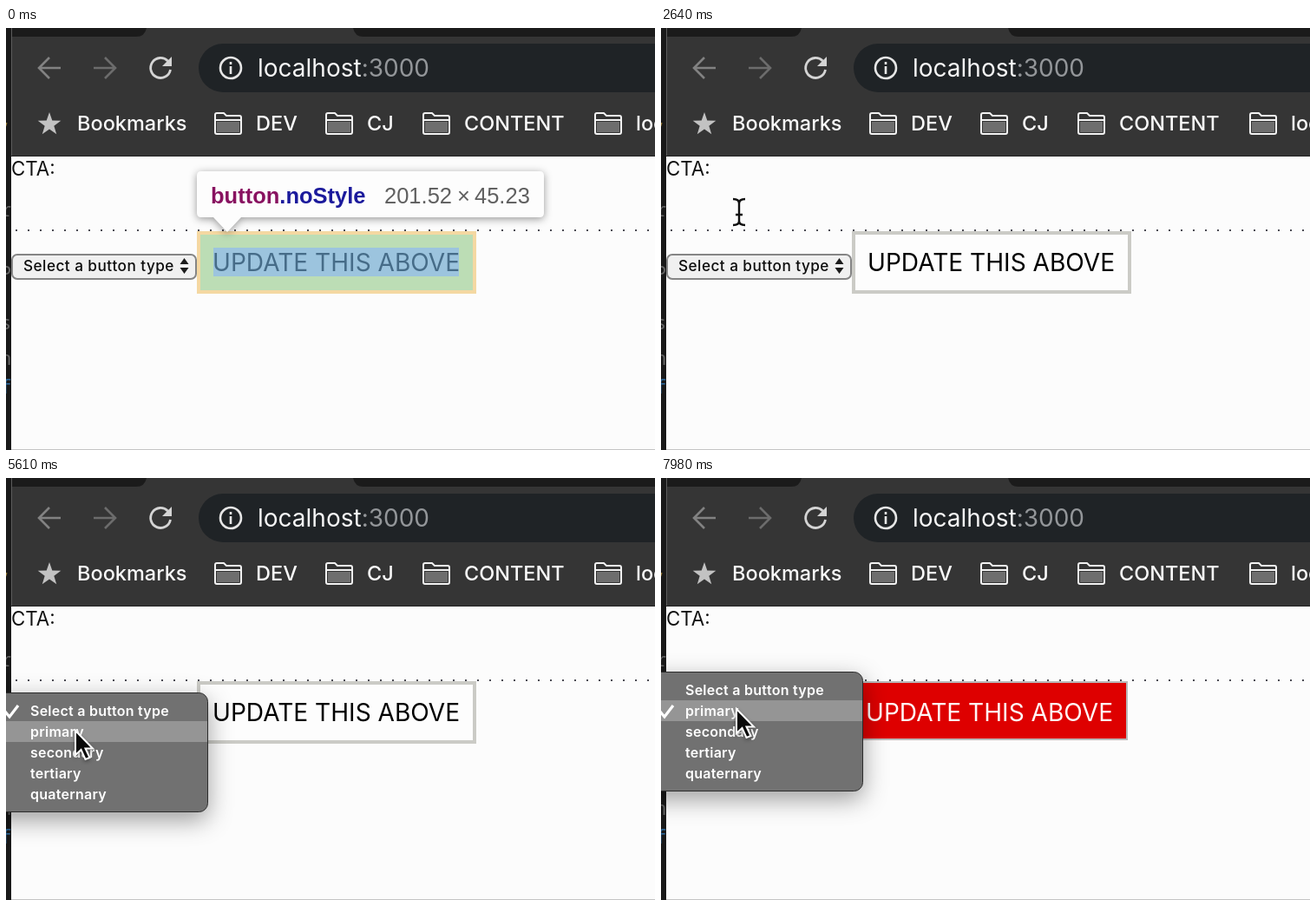
Animation, 748 px wide and 486 px high, one loop 8000 ms. Source, as an HTML page:

```html
<!DOCTYPE html>
<html lang="en">
<head>
<meta charset="utf-8">
<title>Button type picker</title>
<style>
  html, body { margin: 0; width: 100%; height: 100%; overflow: hidden; background: #fcfcfc; }
  svg { display: block; width: 748px; height: 486px; }
  text { font-family: Inter, sans-serif; white-space: pre; }
  .bookmarks text { font-size: 23.5px; font-weight: 500; fill: #fafafa; }
  .menu text { font-size: 16px; font-weight: 600; letter-spacing: .25px; fill: #fff; }
  .tip text { font-family: "Liberation Sans", Arial, sans-serif; font-size: 25.5px; }
  .code text { font: 21px "Noto Sans Mono", monospace; fill: #666; text-anchor: end; }
  .tip .label, .label { font: 28.1px Inter, sans-serif; }
  #panel { filter: drop-shadow(0 9px 14px rgba(0, 0, 0, .38)); }
  #tip { filter: drop-shadow(0 2px 5px rgba(0, 0, 0, .4)); }
  #arrow { filter: drop-shadow(0 2px 2px rgba(0, 0, 0, .35)); }
</style>
</head>
<body>
<svg viewBox="0 0 748 486">
  <defs>
    <g id="folder">
      <path d="M3 11H29V23H3Z" fill="#6e6e6e"/>
      <path d="M1 3Q1 1 3 1H11L14 4H29Q31 4 31 6V23Q31 25 29 25H3Q1 25 1 23ZM1 9H31" fill="none" stroke="#f2f2f2" stroke-width="2" stroke-linejoin="round"/>
    </g>
  </defs>

  <rect width="748" height="486" fill="#fcfcfc"/>

  <!-- editor sliver behind the window -->
  <rect width="6" height="486" fill="#191919"/>
  <g class="code">
    <text x="6" y="112" style="fill:#9a7c34">,</text>
    <text x="6" y="217">r</text>
    <text x="6" y="290">P</text>
    <text x="6" y="347">s</text>
    <text x="6" y="388">n</text>
    <text x="6" y="421" style="fill:#2c689c">f</text>
  </g>

  <!-- browser chrome -->
  <rect x="6" width="742" height="148" fill="#353535"/>
  <path d="M6 0H162Q160 10 150 10H6ZM400 0H748V10H412Q402 10 400 0Z" fill="#1b1b1b"/>
  <path d="M6.5 0V148" stroke="#5c5c5c"/>
  <path d="M6 147.5H748" stroke="#222"/>
  <path d="M748 18H250A28 28 0 0 0 250 74H748Z" fill="#1f2326"/>
  <g fill="none" stroke-width="2.6">
    <path d="M63 46H39M50 34L38 46L50 58" stroke="#828282"/>
    <path d="M101 46H125M114 34L126 46L114 58" stroke="#6c6c6c"/>
    <path d="M186.5 38A11.5 11.5 0 1 0 189.5 48" stroke="#d4d4d4" stroke-width="2.8"/>
    <circle cx="259" cy="46" r="12" stroke="#e6e6e6"/>
    <path d="M259 44V53M259 39V42" stroke="#e6e6e6"/>
  </g>
  <path d="M191 33V44H180Z" fill="#d4d4d4"/>
  <text x="290" y="56" font-size="28" fill="#f6f6f6">localhost<tspan fill="#939699">:3000</tspan></text>
  <path id="star" fill="#c2c2c2"/>
  <g class="bookmarks">
    <text x="82" y="118">Bookmarks</text>
    <use href="#folder" x="240" y="97"/><text x="288" y="118">DEV</text>
    <use href="#folder" x="368" y="97"/><text x="416" y="118">CJ</text>
    <use href="#folder" x="480" y="97"/><text x="528" y="118">CONTENT</text>
    <use href="#folder" x="678" y="97"/><text x="726" y="118">localhost</text>
  </g>

  <!-- page -->
  <text x="6" y="170" font-size="22.3" fill="#121212">CTA:</text>
  <path d="M11 233H748" stroke="#4c4c54" stroke-width="2" stroke-dasharray="2 12"/>
  <path d="M6 485.5H748" stroke="#c4c4c4"/>

  <g id="plain">
    <rect x="222" y="236" width="318" height="68" fill="#fdfdfd" stroke="#cbcbc6" stroke-width="4"/>
    <text class="label" x="238" y="280">UPDATE THIS ABOVE</text>
  </g>
  <g id="red">
    <rect x="221" y="235" width="316" height="66" fill="#de0000" stroke="#b9b9b9" stroke-width="2"/>
    <text class="label" x="236" y="280" fill="#fff6f6">UPDATE THIS ABOVE</text>
  </g>

  <rect id="ring" x="5.5" y="258.5" width="216" height="34" rx="8" fill="none" stroke="#a5a5a8" stroke-width="3"/>
  <rect x="7" y="261" width="212" height="28" rx="6" fill="#f0f0f0" stroke="#858585" stroke-width="2"/>
  <text id="value" x="20" y="280" font-size="17.2" font-weight="500" letter-spacing=".45" fill="#0c0c0c"></text>
  <path d="M200.5 272L205.5 265L210.5 272ZM200.5 276L205.5 283L210.5 276Z" fill="#1c1c1c"/>

  <!-- element inspector: border, padding and content boxes -->
  <g id="inspect" class="tip">
    <rect x="222" y="236" width="318" height="68" fill="#bcddb5" stroke="#f4d8a2" stroke-width="4"/>
    <rect x="239" y="253" width="283" height="33" fill="#9cc4de"/>
    <text class="label" x="238" y="280" fill="#466c88">UPDATE THIS ABOVE</text>
    <path id="tip" fill="#fdfdfd" d="M225 165H615Q620 165 620 170V213Q620 218 615 218H271L255 235L239 218H225Q220 218 220 213V170Q220 165 225 165Z"/>
    <text x="236" y="202" font-weight="bold" fill="#881260">button<tspan fill="#1b1a9c">.noStyle</tspan></text>
    <text x="436" y="202" fill="#606060">201.52</text>
    <text x="520" y="202" fill="#606060">×</text>
    <text x="540" y="202" fill="#606060">45.23</text>
  </g>

  <!-- drop-down, drawn with its top at zero -->
  <g id="menu" class="menu">
    <rect id="panel" x="-30" y="0" width="262.5" height="137" rx="10" fill="#717171" stroke="#2c2c2c"/>
    <rect id="hover" x="-30" width="262" height="24" fill="#959595"/>
    <path id="check" d="M-2 0L4 7L14 -6" fill="none" stroke="#fff" stroke-width="3.2"/>
    <g id="items"></g>
  </g>

  <g id="cursor">
    <path id="arrow" d="M0 0V28L6.5 22L11.5 33L16.5 31L11.5 20.5H20Z" fill="#0a0a0a" stroke="#fff" stroke-width="2"/>
    <path id="beam" d="M-7 -15Q0 -15 0 -10Q0 -15 7 -15M0 -10V10M-7 15Q0 15 0 10Q0 15 7 15M-4 3H4" fill="none" stroke="#111" stroke-width="2.4"/>
  </g>
</svg>
<script>
const LOOP = 8000, ROW = 24;
const OPTIONS = ['Select a button type', 'primary', 'secondary', 'tertiary', 'quaternary'];
const HIGHLIGHT_END = 420, OPEN = 4020, CLOSE = 5950, CHOSEN = 6180, REOPEN = 7410;
const FADE = 210;

// time, x, y of the pointer tip
const PATH = [
  [870, 505, 490], [1350, 262, 253], [1650, 262, 253], [2400, 248, 270],
  [2640, 90, 212], [2880, 84, 214], [3240, 78, 272], [4900, 78, 272],
  [5400, 80, 291], [6400, 80, 291], [7050, 87, 266], [LOOP, 87, 266]
];

const el = id => document.getElementById(id);
const show = (id, on) => el(id).setAttribute('visibility', on ? 'visible' : 'hidden');
const move = (id, x, y) => el(id).setAttribute('transform', `translate(${x} ${y})`);

el('star').setAttribute('d', 'M' + Array.from({ length: 10 }, (_, i) => {
  const r = i % 2 ? 5.6 : 14, a = i * Math.PI / 5;
  return `${50 + r * Math.sin(a)} ${111 - r * Math.cos(a)}`;
}).join('L') + 'Z');

el('items').innerHTML = OPTIONS.map((name, i) =>
  `<text x="28" y="${26.5 + ROW * i}">${name}</text>`).join('');

function pointerAt(t) {
  const i = Math.max(1, PATH.findIndex(p => p[0] > t));
  const [t0, x0, y0] = PATH[i - 1], [t1, x1, y1] = PATH[i];
  const k = Math.min(1, Math.max(0, (t - t0) / (t1 - t0)));
  const e = k * k * (3 - 2 * k);
  return [x0 + (x1 - x0) * e, y0 + (y1 - y0) * e];
}

function draw(t) {
  const chosen = t >= CHOSEN ? 1 : 0;
  const [x, y] = pointerAt(t);
  const overText = y > 150 && y < 232;

  show('inspect', t < HIGHLIGHT_END);
  show('plain', !chosen);
  show('red', chosen);
  show('ring', t >= OPEN);
  el('value').textContent = OPTIONS[chosen];

  const open = (t >= OPEN && t < CLOSE + FADE) || t >= REOPEN;
  const fading = t >= CLOSE && t < CLOSE + FADE;
  const top = 247.5 - ROW * chosen;
  const row = Math.floor((y - top - 8.5) / ROW);
  el('menu').style.display = open ? '' : 'none';
  el('menu').style.opacity = fading ? 1 - (t - CLOSE) / FADE : 1;
  move('menu', 0, top);
  move('hover', 0, 8.5 + ROW * row);
  move('check', 0, 20.5 + ROW * chosen);

  show('arrow', t >= PATH[0][0] && !overText);
  show('beam', t >= PATH[0][0] && overText);
  move('cursor', x, y);
}

const start = performance.now();
function tick() {
  draw((performance.now() - start) % LOOP);
  requestAnimationFrame(tick);
}
tick();
</script>
</body>
</html>
```
